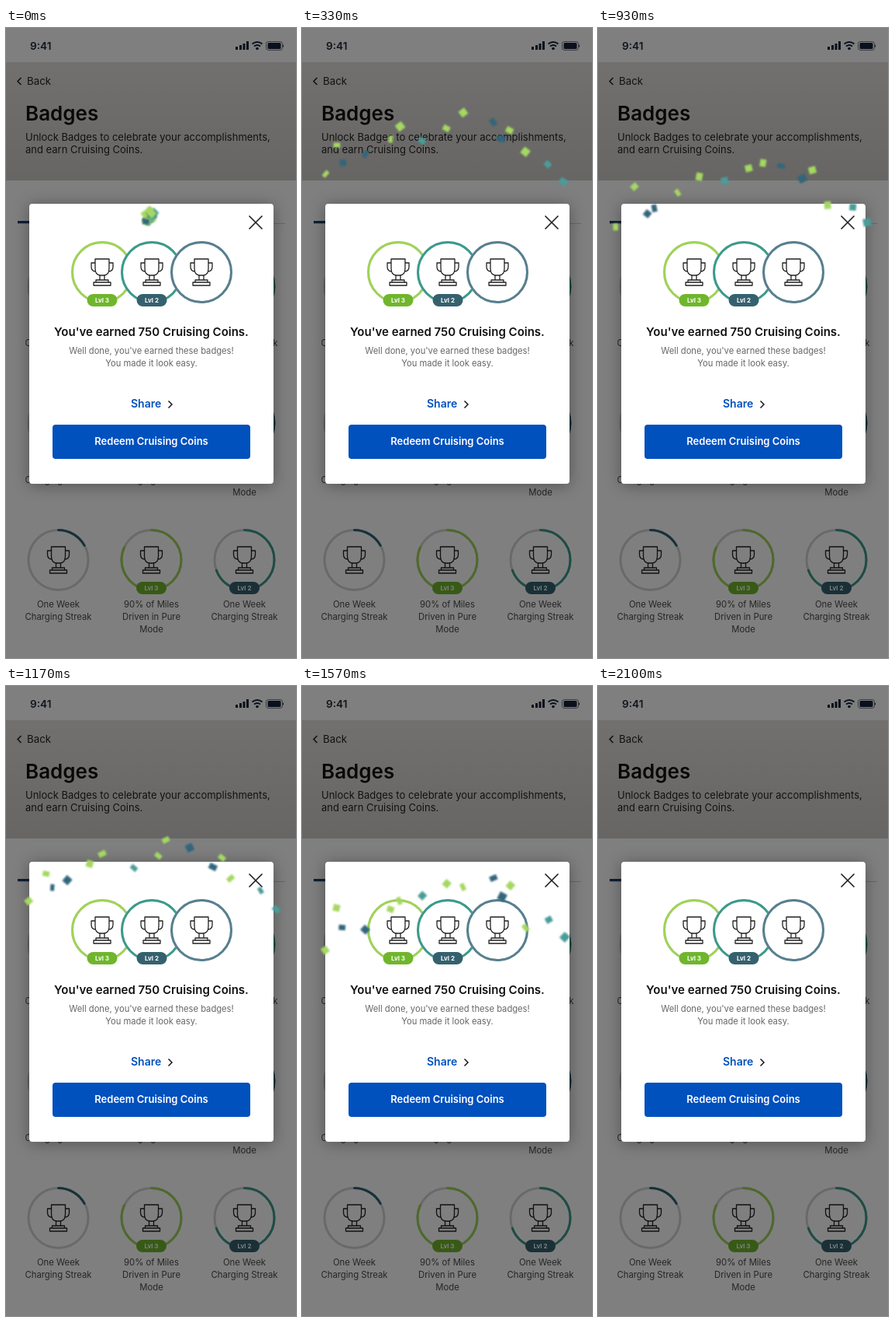
An HTML page with a canvas that plays this animation: 374x810 px, repeating every 2.36 s.

```html
<!DOCTYPE html>
<html lang="en">
<head>
<meta charset="utf-8">
<title>Badges</title>
<style>
html, body { margin: 0; width: 374px; height: 810px; overflow: hidden; background: #808080; }
svg, canvas { position: absolute; left: 0; top: 0; }
text { font-family: Inter, "Open Sans", sans-serif; }
.mid { text-anchor: middle; }
.bold { font-weight: 600; }
.cap { font-size: 11.3px; fill: #4a4a4a; text-anchor: middle; }
.pill { font-size: 8px; font-weight: 700; fill: #fff; text-anchor: middle; }
.line { fill: none; stroke: #1a1a1a; stroke-width: 1.5; }
.modal { filter: drop-shadow(0 2px 10px rgba(0, 0, 0, .35)); }
</style>
</head>
<body>
<svg width="374" height="810" viewBox="0 0 374 810">
  <defs>
    <linearGradient id="head" x2="0" y2="1">
      <stop stop-color="#e4e2df"/><stop offset="1" stop-color="#d0cdc9"/>
    </linearGradient>
    <g id="cup" fill="none" stroke="#222" stroke-width="1.3" stroke-linejoin="round">
      <path d="M-9-17H9V-5Q9 4 2 4H-2Q-9 4-9-5Z"/>
      <path d="M-9-12H-14V-7Q-14-1-8-1M9-12H14V-7Q14-1 8-1M-3 4V10M3 4V10"/>
      <path d="M-8 10H8V13H-8ZM-11 13H11V17H-11Z"/>
    </g>
  </defs>
  <rect width="374" height="810" fill="#fff"/>
  <rect y="44" width="374" height="152" fill="url(#head)"/>

  <text x="31" y="28" font-size="13.6" class="bold" fill="#222a38">9:41</text>
  <g fill="#14203a">
    <path d="M296 24h3v4h-3zM301 22h3v6h-3zM305.500 20h3v8h-3zM310 17h3v11h-3z"/>
    <rect x="337.500" y="19" width="17" height="8" rx="1.500"/>
    <path d="M357 21q2 2 0 4z"/>
    <circle cx="324" cy="26.500" r="1.800"/>
    <g fill="none" stroke="#14203a">
      <rect x="335.500" y="17.500" width="21" height="11" rx="3" stroke-opacity=".6"/>
      <path d="M317.500 20.500q6.500-5 13 0M320 23.500q4-3 8 0" stroke-width="2"/>
    </g>
  </g>

  <path class="line" d="M19.500 64L15 68.500L19.500 73"/>
  <text x="27" y="73" font-size="13.3" fill="#222">Back</text>
  <text x="25" y="119" font-size="26" class="bold" fill="#111">Badges</text>
  <g font-size="13" fill="#222">
    <text x="25" y="145">Unlock Badges to celebrate your accomplishments,</text>
    <text x="25" y="161">and earn Cruising Coins.</text>
  </g>
  <path d="M15 251.500H360" stroke="#d0d0d0"/>
  <path d="M15 249.500H100" stroke="#1c3f70" stroke-width="3"/>
  <g id="grid"></g>

  <rect width="374" height="810" opacity=".5"/>

  <rect class="modal" x="30" y="226" width="315" height="360" rx="4" fill="#fff"/>
  <path class="line" d="M313.500 241.500L330.500 258.500M330.500 241.500L313.500 258.500"/>
  <g id="earned"></g>
  <text x="187.500" y="396" font-size="15" class="mid bold" fill="#111">You've earned 750 Cruising Coins.</text>
  <g font-size="11.2" class="mid" fill="#666">
    <text x="187.500" y="419">Well done, you've earned these badges!</text>
    <text x="187.500" y="435">You made it look easy.</text>
  </g>
  <text x="161" y="488" font-size="14" class="bold" fill="#0050be">Share</text>
  <path class="line" d="M209.500 479.500L214 484L209.500 488.500"/>
  <rect x="60" y="510" width="255" height="44" rx="4" fill="#0050be"/>
  <text x="187.500" y="536" font-size="13" class="mid bold" fill="#fff">Redeem Cruising Coins</text>
</svg>
<canvas id="stage" width="374" height="810"></canvas>

<script>
const GREEN = '#9fd356', TEAL = '#3a9a8c', SLATE = '#567f8f', NAVY = '#2d6272';
const byId = id => document.getElementById(id);

function badge(x, y, { color, degrees = 360, level }) {
  const ring = `cx="${x}" cy="${y}" r="38.5" stroke-width="3"`;
  let out = `<circle ${ring} fill="#fff" stroke="#d4d4d4"/>
    <circle ${ring} fill="none" stroke="${color}" stroke-linecap="round" pathLength="360"
      stroke-dasharray="${degrees} 360" transform="rotate(-90 ${x} ${y})"/>
    <use href="#cup" x="${x}" y="${y}"/>`;
  if (level) {
    out += `<rect x="${x - 19.5}" y="${y + 28}" width="39" height="16" rx="8"
      fill="${level === 3 ? '#70b62c' : '#35616f'}"/>
      <text class="pill" x="${x}" y="${y + 39}">Lvl ${level}</text>`;
  }
  return out;
}

const streak = ['One Week', 'Charging Streak'];
const pure = ['90% of Miles', 'Driven in Pure', 'Mode'];
const started = { color: NAVY, degrees: 61, caption: streak };
const driven = { color: GREEN, degrees: 295, level: 3, caption: pure };
const charged = { color: TEAL, degrees: 250, level: 2, caption: streak };
const rows = [
  [started, driven, charged],
  [started, charged, { ...driven, color: NAVY }],
  [started, driven, charged]
];
byId('grid').innerHTML = rows.map((row, r) => row.map((item, c) => {
  const x = 67.5 + 120 * c, y = 332 + 176 * r;
  return badge(x, y, item) + item.caption.map((line, i) =>
    `<text class="cap" x="${x}" y="${y + 61 + 16 * i}">${line}</text>`).join('');
}).join('')).join('');

byId('earned').innerHTML = badge(124, 314, { color: GREEN, level: 3 }) +
  badge(188, 314, { color: TEAL, level: 2 }) + badge(252, 314, { color: SLATE });

// Confetti bursts from one point into an arch, then flutters down.
const LOOP = 2360, STEP = 100 / 3, END = 2090, COUNT = 15;
const colors = ['#a4d862', '#32667c', '#a4d862', '#4a9c98'];

let seed = 7;
const random = () => (seed = seed * 16807 % 2147483647) / 2147483647;

const pieces = Array.from({ length: COUNT }, (_, i) => {
  const side = 2 * ((i * .618 + .1) % 1) - 1;
  return {
    color: colors[i % 4],
    side,
    rise: 170 - 85 * side * side - 45 * random(),
    jitter: random() * 2 - 1,
    phase: random() * 2 * Math.PI,
    size: 8 + 3 * random()
  };
});

const ctx = byId('stage').getContext('2d');

function drawPiece({ color, side, rise, jitter, phase, size }, t) {
  const burst = 1 - Math.exp(-t / 70);
  const fall = .137 * t * t / (t + 600);
  const sway = burst * Math.sin(phase + t * .005);
  const x = 185 + side * (6 + 168 * burst) + 6 * sway;
  const y = 242 + 8 * jitter - rise * burst + fall + 7 * burst * Math.sin(phase * 2 + t * .008);
  ctx.save();
  ctx.translate(x, y);
  ctx.rotate(phase + t * .004);
  ctx.scale(1, .8 + .2 * Math.sin(phase + t * .012));
  ctx.globalAlpha = Math.min(1, (END - t) / 300);
  ctx.filter = 'blur(.8px)';
  ctx.fillStyle = color;
  ctx.fillRect(-size / 2, -size / 2, size, size);
  ctx.restore();
}

function frame(now) {
  const t = Math.floor((now % LOOP + 4) / STEP) * STEP;
  ctx.clearRect(0, 0, 374, 810);
  if (t < END) pieces.forEach(piece => drawPiece(piece, t));
}

const start = performance.now();
function tick() {
  frame(performance.now() - start);
  requestAnimationFrame(tick);
}
tick();
</script>
</body>
</html>
```
